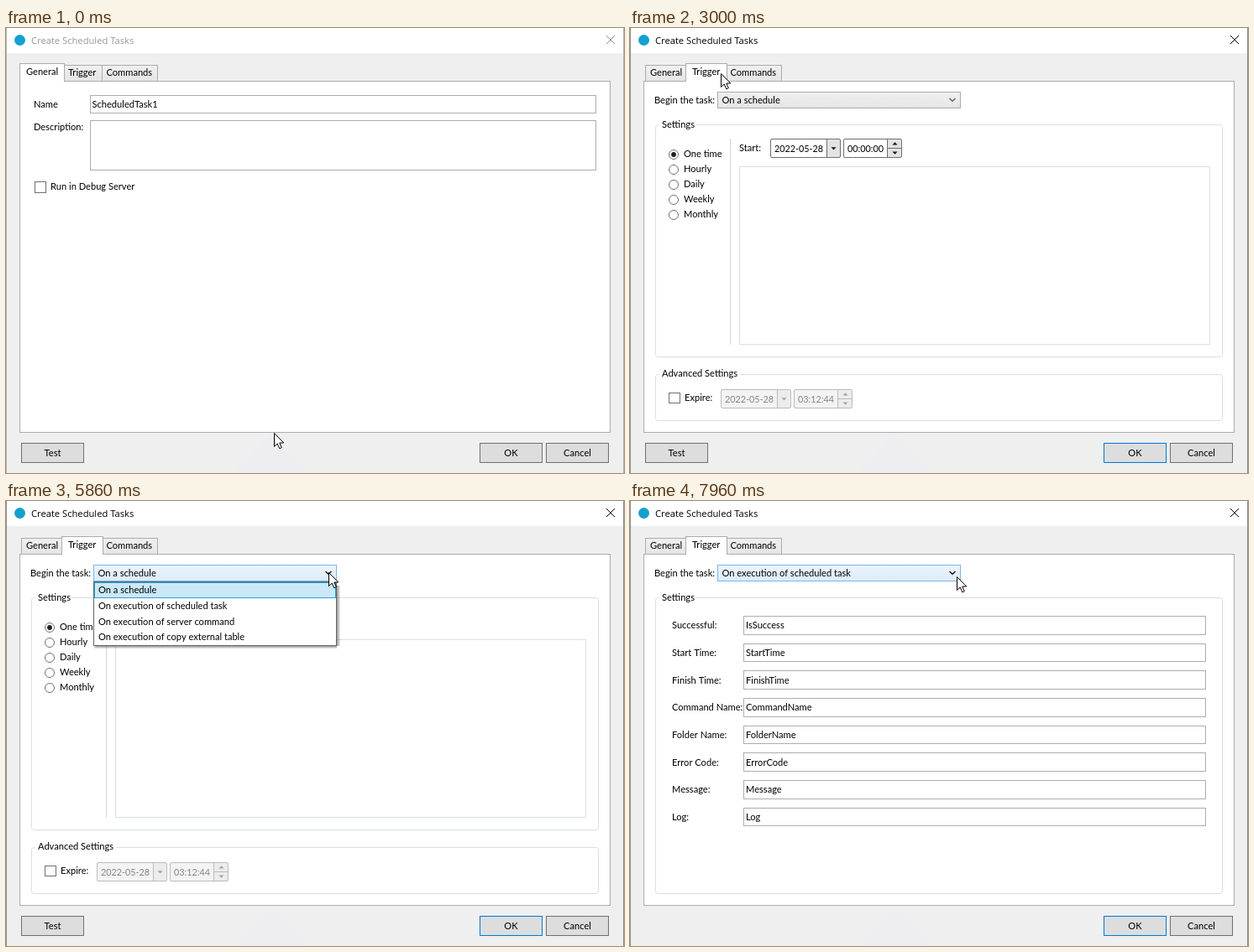
Animation, 736 px wide and 531 px high, one loop 8 s. Source, as an HTML page with a canvas:

```html
<!DOCTYPE html>
<html lang="en">
<head>
<meta charset="utf-8">
<title>Create Scheduled Tasks</title>
<style>
  html, body { margin: 0; width: 100%; height: 100%; overflow: hidden; background: #efefef; }
  canvas { display: block; }
</style>
</head>
<body>
<canvas id="stage" width="736" height="531"></canvas>
<script>
const g = document.getElementById('stage').getContext('2d');
const LOOP = 8000;
const BODY = '11.12px Lato, sans-serif';
const DIGITS = '10.8px Lato, sans-serif';
const TITLE = '11.2px "Open Sans", sans-serif';
const GREY = '#acacac', BLUE = '#7eb4ea', GROUP = '#d5dfe5';

// Pointer moves: start, end, from x, y, to x, y
const MOVES = [
  [0, 830, 319, 483, 94, 68],
  [830, 960, 94, 68, 91, 57],
  [1140, 1200, 91, 57, 91, 55],
  [2999, 3000, 91, 55, 108, 54],
  [3000, 3660, 108, 54, 377, 83],
  [3800, 4030, 377, 83, 383, 84],
  [5830, 5860, 383, 84, 384, 85],
  [5860, 6660, 384, 85, 381, 114],
  [6670, 6700, 381, 114, 381, 115],
  [6870, 6930, 381, 115, 380, 120],
  [7500, 7960, 380, 120, 389, 90]
];
const OPTIONS = ['On a schedule', 'On execution of scheduled task',
  'On execution of server command', 'On execution of copy external table'];
const FIELDS = [['Successful:', 'IsSuccess'], ['Start Time:', 'StartTime'],
  ['Finish Time:', 'FinishTime'], ['Command Name:', 'CommandName'],
  ['Folder Name:', 'FolderName'], ['Error Code:', 'ErrorCode'],
  ['Message:', 'Message'], ['Log:', 'Log']];

const ease = p => (1 - Math.cos(Math.PI * p)) / 2;
const inside = (p, x, y, w, h) => p.x >= x && p.x < x + w && p.y >= y && p.y < y + h;

function pointerAt(t) {
  let p = { x: MOVES[0][2], y: MOVES[0][3] };
  for (const [a, b, x0, y0, x1, y1] of MOVES) {
    if (t < a) break;
    const k = ease(Math.min(1, (t - a) / (b - a)));
    p = { x: Math.round(x0 + (x1 - x0) * k), y: Math.round(y0 + (y1 - y0) * k) };
  }
  return p;
}

function text(s, x, y, color = '#000', font = BODY, align = 'left') {
  g.font = font;
  g.fillStyle = color;
  g.textAlign = align;
  g.fillText(s, x, y);
}

function fill(x, y, w, h, color) {
  g.fillStyle = color;
  g.fillRect(x, y, w, h);
}

function box(x, y, w, h, paint, border) {
  fill(x, y, w, h, paint);
  g.strokeStyle = border;
  g.lineWidth = 1;
  g.strokeRect(x + .5, y + .5, w - 1, h - 1);
}

function path(points, close) {
  g.beginPath();
  points.forEach(([x, y], i) => i ? g.lineTo(x, y) : g.moveTo(x, y));
  if (close) g.closePath();
}

function line(points, color, width = 1) {
  path(points);
  g.strokeStyle = color;
  g.lineWidth = width;
  g.stroke();
}

function shade(y, h, top, bottom) {
  const s = g.createLinearGradient(0, y, 0, y + h);
  s.addColorStop(0, top);
  s.addColorStop(1, bottom);
  return s;
}

const face = (y, h, hot) => hot ? shade(y, h, '#ecf4fc', '#dcecfc') : shade(y, h, '#f0f0f0', '#e5e5e5');

function group(label, base, y, h, gap, framed) {
  if (framed) {
    g.strokeStyle = GROUP;
    g.lineWidth = 1;
    g.beginPath();
    g.roundRect(30.5, y + .5, 675, h - 1, 3);
    g.stroke();
    fill(35, y - 2, gap - 35, 5, '#fff');
  }
  text(label, 38, base);
}

function button(label, x, border = '#707070') {
  box(x, 495, 75, 24, '#ddd', border);
  text(label, x + 37.5, 511, '#000', BODY, 'center');
}

function triangle(x, y, color, up) {
  const d = up ? -1 : 1;
  path([[x - 3, y - d * 1.5], [x + 3, y - d * 1.5], [x, y + d * 1.8]], true);
  g.fillStyle = color;
  g.fill();
}

function dateTime(x, y, date, time, on) {
  const edge = on ? '#6e6e6e' : '#bcbcbc';
  const ink = on ? '#000' : '#858585';
  const paint = on ? '#fff' : '#f3f3f3';
  const knob = on ? '#e3e3e3' : '#ececec';
  const arrow = on ? '#111' : '#a5a5a5';
  for (const [left, w, s, cut] of [[x, 84, date, 68], [x + 87, 70, time, 53]]) {
    g.beginPath();
    g.roundRect(left + .5, y + .5, w - 1, 22, 1.5);
    g.fillStyle = paint;
    g.fill();
    fill(left + cut, y + 1, w - cut - 1, 21, knob);
    g.strokeStyle = edge;
    g.lineWidth = 1;
    g.stroke();
    line([[left + cut - .5, y + 1], [left + cut - .5, y + 22]], edge);
    text(s, left + 5, y + 16, ink, DIGITS);
  }
  triangle(x + 75.5, y + 11.8, arrow);
  line([[x + 140, y + 11.5], [x + 156, y + 11.5]], edge);
  triangle(x + 148.5, y + 6, arrow, true);
  triangle(x + 148.5, y + 17, arrow);
}

function tabs(onTrigger, p) {
  const list = [['General', 18, 49, 24], ['Trigger', 69, 46, 74], ['Commands', 114, 67, 119.5]];
  const sel = onTrigger ? 1 : 0;
  list.forEach(([label, x, w, tx], i) => {
    if (i === sel) return;
    const hot = inside(p, x, 44, w, 20);
    box(x, 44, w, 20, face(44, 20, hot), hot ? BLUE : GREY);
    text(label, tx, 57);
  });
  line([[16, 63.5], [720, 63.5]], GREY);
  const [x, w] = onTrigger ? [66, 50] : [16, 54];
  box(x, 42, w, 22, '#fff', GREY);
  fill(x + 1, 63, w - 2, 2, '#fff');
  text(list[sel][0], list[sel][3], 56);
}

function checkbox(x, y, h) {
  box(x, y, 14, h, '#fff', '#707070');
}

function generalPage(p) {
  const edge = (y, h) => inside(p, 100, y, 603, h) ? BLUE : '#abadb3';
  text('Name', 33, 95);
  box(100, 80, 603, 22, '#fff', edge(80, 22));
  text('ScheduledTask1', 102.5, 95);
  text('Description:', 33, 122);
  box(100, 110, 603, 60, '#fff', edge(110, 60));
  checkbox(34, 183, 14);
  text('Run in Debug Server', 53, 193);
}

function combo(label, hot) {
  text('Begin the task:', 29, 90);
  box(104, 76, 290, 20, face(76, 20, hot), hot ? BLUE : GREY);
  text(label, 109.5, 90);
  line([[380.5, 84], [384, 87.2], [387.5, 84]], hot ? '#111' : '#606060', 1.4);
}

function schedulePage(framed) {
  group('Settings', 119, 115, 278, 79, framed);
  ['One time', 'Hourly', 'Daily', 'Weekly', 'Monthly'].forEach((s, i) => {
    const y = 151 + 18 * i;
    g.beginPath();
    g.arc(52, y, 5.5, 0, 7);
    g.fillStyle = '#fff';
    g.fill();
    g.strokeStyle = '#707070';
    g.lineWidth = 1;
    g.stroke();
    if (!i) {
      g.beginPath();
      g.arc(52, y, 2.9, 0, 7);
      g.fillStyle = '#212121';
      g.fill();
    }
    text(s, 64, y + 3);
  });
  line([[119.5, 132], [119.5, 378]], '#d2d6da');
  text('Start:', 130, 147);
  dateTime(167, 132, '2022-05-28', '00:00:00', true);
  box(130, 165, 561, 213, '#fff', '#d3e0e8');
  group('Advanced Settings', 416, 413, 56, 131, framed);
  checkbox(46, 435, 13);
  text('Expire:', 65, 445);
  dateTime(108, 431, '2022-05-28', '03:12:44', false);
}

function taskPage(framed) {
  group('Settings', 119, 115, 354, 79, framed);
  FIELDS.forEach(([label, value], i) => {
    const y = 137 + 32.65 * i;
    const top = Math.round(y), bottom = Math.round(y + 22.8), base = Math.round(y + 15.4);
    text(label, 50, base);
    box(135, top, 551, bottom - top, '#fff', '#abadb3');
    text(value, 138, base);
  });
}

function popup(t) {
  const k = Math.min(1, (t - 4300) / 130);
  const shown = Math.round(4 + 73 * k);
  const top = 96 + shown - 77;
  g.save();
  g.beginPath();
  g.rect(100, 96, 304, 90);
  g.clip();
  for (let i = 4; i > 0; i--) {
    fill(109 - i, top + 5, 285 + i, 72 + i - 1, 'rgba(0,0,0,.13)');
    fill(394, top + 5, i, 72, 'rgba(0,0,0,.1)');
  }
  box(104, top, 290, 77, '#fff', '#646464');
  const pick = t < 6900 ? 0 : 1;
  box(105, top + 1 + 19 * pick, 288, 19, '#cbe8f6', '#26a0da');
  OPTIONS.forEach((s, i) => text(s, 110, top + 14 + Math.ceil(18.6 * i)));
  g.restore();
}

function pointer(p) {
  g.save();
  g.translate(p.x + .5, p.y + .5);
  path([[0, 0], [0, 16], [3.7, 12.5], [6.3, 18.3], [8.8, 17.2], [6.3, 11.5], [11.3, 11.5]], true);
  g.fillStyle = '#fff';
  g.fill();
  g.strokeStyle = '#000';
  g.lineWidth = 1;
  g.stroke();
  g.restore();
}

function windowFrame(active) {
  fill(0, 0, 736, 531, '#efefef');
  path([[272, 531], [314, 487], [360, 531]], true);
  g.fillStyle = '#eeeef2';
  g.fill();
  fill(0, 0, 736, 30, '#fff');
  g.beginPath();
  g.arc(16.5, 14.5, 6.5, 0, 7);
  g.fillStyle = '#14a0d2';
  g.fill();
  text('Create Scheduled Tasks', 30, 19, active ? '#000' : '#999', TITLE);
  const ink = active ? '#000' : '#8a8a8a';
  line([[715, 9], [725, 19]], ink);
  line([[725, 9], [715, 19]], ink);
  const side = active ? '#8f8f8f' : '#b4b4b4';
  fill(0, 0, 1, 531, side);
  fill(735, 0, 1, 531, side);
  box(16, 63, 704, 420, '#fff', GREY);
}

function draw(t) {
  const active = t >= 1630;
  const picked = t >= 7200;
  const newPage = t >= 7260;
  const open = t >= 4300 && !picked;
  const p = pointerAt(t);
  windowFrame(active);
  tabs(active, p);
  if (active) {
    const hot = inside(p, 104, 76, 290, 20);
    combo(OPTIONS[picked ? 1 : 0], hot);
    if (newPage) taskPage(t >= 7300);
    else schedulePage(t >= 1730);
  } else generalPage(p);
  if (!newPage) button('Test', 18);
  button('OK', 564, active ? '#0078d7' : '#707070');
  button('Cancel', 643);
  if (open) popup(t);
  pointer(p);
}

const start = performance.now();
function tick() {
  draw((performance.now() - start) % LOOP);
  requestAnimationFrame(tick);
}
tick();
</script>
</body>
</html>
```
